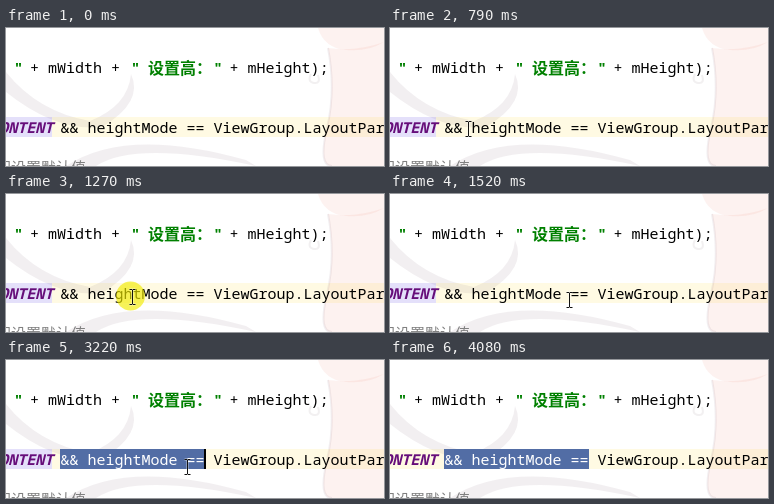
Animation, 378 px wide and 138 px high, one loop 4150 ms. Source, as an HTML page with a canvas:

```html
<!DOCTYPE html>
<html lang="zh">
<head>
<meta charset="utf-8">
<style>
  html, body { margin: 0; width: 100%; height: 100%; overflow: hidden; background: #fff; }
  canvas { display: block; }
</style>
</head>
<body>
<canvas id="stage" width="378" height="138"></canvas>
<script>
const ctx = document.getElementById('stage').getContext('2d');
const W = 378, H = 138, LOOP = 4150;
const LINE = 20, ROW = 89, BASE = 45, CELL = 9;
const CODE_X = 54.5;
const MONO = '"Noto Sans Mono", monospace';
const CJK = '"Noto Sans CJK SC", "Noto Sans CJK", sans-serif';
const GREEN = '#008000', BLACK = '#000';

const smooth = p => p * p * (3 - 2 * p);
const accelerate = p => p * p;
const lerp = (a, b, p) => a + (b - a) * p;

// Places the pointer visits
const below = { x: 217, y: 142 }, left = { x: 15, y: 93 }, word = { x: 79, y: 101 };
const operator = { x: 180, y: 106 }, away = { x: 286, y: 147 };

const moves = [
  { start: 190, end: 490, from: below, to: left, ease: smooth },
  { start: 490, end: 790, from: left, to: word, ease: smooth },
  { start: 1050, end: 1370, from: word, to: operator, ease: accelerate },
  { start: 3190, end: 3560, from: operator, to: away, ease: smooth }
];

function pointerAt(t) {
  const move = moves.filter(m => m.start <= t).pop();
  if (!move) return null;
  const { start, end, from, to, ease } = move;
  const p = ease(Math.min(1, (t - start) / (end - start)));
  return { x: Math.round(lerp(from.x, to.x, p)), y: Math.round(lerp(from.y, to.y, p)) };
}

function rect(color, x, y, w, h) {
  ctx.fillStyle = color;
  ctx.fillRect(x, y, w, h);
}

function text(str, x, y, color = BLACK, font = '15px ' + MONO) {
  ctx.font = font;
  ctx.fillStyle = color;
  ctx.fillText(str, x, y);
}

function fill(path, color) {
  ctx.fillStyle = color;
  ctx.fill(new Path2D(path));
}

function stroke(path, color, width) {
  ctx.strokeStyle = color;
  ctx.lineWidth = width;
  ctx.stroke(new Path2D(path));
}

function wallpaper() {
  const gray = 'rgba(110,85,100,.09)', pink = 'rgba(225,110,95,.09)';
  fill('M125 46 Q138 74 96 99 L84 93 Q122 78 125 46Z', gray);
  fill('M0 44 Q32 84 84 93 L96 99 Q50 104 0 64Z', gray);
  fill('M60 138 Q120 98 240 132 L250 138 Q130 112 90 138Z', gray);
  fill('M312 0 Q318 20 340 22 T378 14 V0Z', pink);
  fill('M322 20 Q330 62 321 100 T326 138 H378 V14 Q350 24 322 20Z', pink);
  stroke('M322 20 Q330 62 321 100 T326 138', gray, 2);
  stroke('M305 46 q-4 8 3 9 t4 -8', gray, 2);
}

function code(selected) {
  const bold = 'bold 15px ' + MONO;
  text('"', 8, BASE, GREEN, bold);
  text('+ mWidth +', 24, BASE);
  text('"', 125, BASE, GREEN, bold);
  text('设置高：', 142, BASE + 1, GREEN, 'bold 16px ' + CJK);
  text('"', 207.5, BASE, GREEN, bold);
  text('+ mHeight);', 223.5, BASE);

  const y = BASE + 3 * LINE;
  text('CONTENT', CODE_X - 7.8 * CELL, y, '#660e7a', 'italic ' + bold);
  text('&& heightMode ==', CODE_X, y, selected ? '#fff' : BLACK);
  text('ViewGroup.LayoutPar', CODE_X + 17 * CELL, y);
  text('即设置默认值', -10, y + 2 * LINE, '#808080', '15px ' + CJK);
}

function halo(x, y) {
  ctx.fillStyle = 'rgba(241,235,0,.65)';
  ctx.beginPath();
  ctx.arc(x, y, 14.5, 0, 2 * Math.PI);
  ctx.fill();
}

function beam(x, y) {
  const shape = `M${x - 3} ${y - 7.5}h2.5l.5 1l.5 -1h2.5M${x} ${y - 7}v14` +
    `M${x - 3} ${y + 7.5}h2.5l.5 -1l.5 1h2.5`;
  stroke(shape, 'rgba(255,255,255,.6)', 2);
  stroke(shape, '#111', 1);
}

function draw(t) {
  const selected = t >= 2540;
  rect('#fff', 0, 0, W, H);
  rect('#fffae3', 0, ROW, W, LINE);
  if (t < 3850) rect('#e4e0fa', 0, ROW, 46, LINE);
  wallpaper();
  if (selected) rect('#526da5', 54, ROW, 145, LINE);
  code(selected);

  if (t >= 2520 && t < 4080) rect(BLACK, selected ? 198 : 72, ROW, 2, LINE);

  const p = pointerAt(t);
  if (!p) return;
  if (t >= 1050 && t < 1520) halo(p.x - 2.5, p.y - 1);
  beam(p.x - 0.5, p.y);
}

const start = performance.now();
function tick() {
  draw((performance.now() - start) % LOOP);
  requestAnimationFrame(tick);
}
tick();
</script>
</body>
</html>
```
